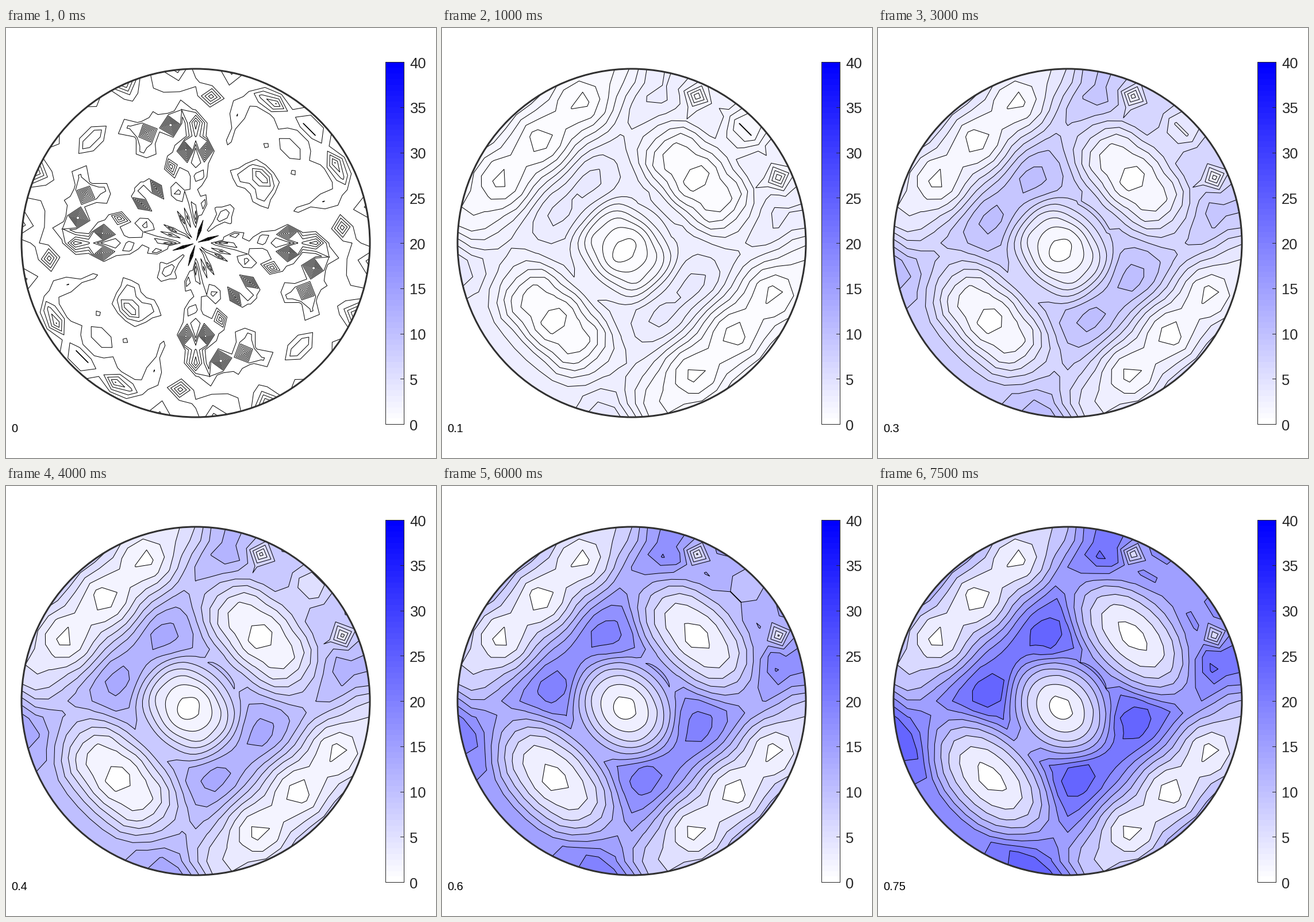
A matplotlib script that plays this animation: 748x748 px, repeating every 8 s.

```python
import numpy as np
import matplotlib.pyplot as plt
from matplotlib.animation import FuncAnimation
from matplotlib.patches import Circle, Rectangle

SIZE, PX = 748, 0.72
CX, CY, R = 330, 374, 303
RINGS, SPOKES = 13, 60
BANDS = 9
FRAMES, STEP = 16, 0.05
plt.rcParams["font.family"] = "Liberation Sans"


def mesh():
    ang = np.linspace(0, 2 * np.pi, SPOKES + 1)
    rad = np.linspace(0, R, RINGS + 1)[:, None]
    return rad * np.cos(ang), rad * np.sin(ang)


def noise():
    """Sparse random cells, mirrored about both diagonals."""
    rng = np.random.default_rng(8)
    cells = 1.05 * rng.exponential(size=(RINGS + 1, 15)) ** 1.25
    cells[0] = 0.2
    flip = cells[:, ::-1]
    full = np.roll(np.hstack([cells, flip, cells, flip]), 8, axis=1)
    return np.hstack([full, full[:, :1]])


def bump(du, dv, width):
    return np.exp(-(du ** 2 + dv ** 2) / (2 * width ** 2))


def mix(a, b, w):
    return a + (b - a) * w


def field(u, v, w):
    """Level map: u runs along the symmetry axis, w goes from early to late."""
    a = np.abs(v)

    # Ridges beside the axis, then a valley on either flank.
    phase = np.pi * np.clip(a - 130, 0, None) / 108
    flank = (1 - np.cos(phase)) / 2
    top = 6.3 - 5.3 * flank + 0.7 * w * np.exp(-((a - 120) / 45) ** 2)
    top += flank * (2 * ((u - 14) / 180) ** 4
                    - 0.6 * np.cos(2 * np.pi * (u - 14) / 100))

    # Summits drift outwards along the ridges and in towards the axis.
    for side in (-1, 1):
        near = -15 + side * mix(45, 70, w)
        far = -15 + side * mix(217, 235, w)
        top += mix(2.0, 1.6, w) * bump(u - near, a - mix(132, 104, w), 36)
        top += 1.4 * bump(u - far, a - mix(158, 136, w), 36)

    # Three basins on the axis: flat at first, cone shaped later.
    n = 3 - w
    dist = np.ones_like(u)
    for centre, length in ((-190, 165), (-18, 112), (160, 165)):
        d = (np.abs((u - centre) / 89) ** n + (a / length) ** n) ** (1 / n)
        dist = np.minimum(dist, d)
    wall = mix(np.sin(np.pi / 2 * dist) ** 3, dist ** 1.6, w)
    low = mix(0.9, 0.5, w) - 0.45 * (1 - w) * np.cos(2 * np.pi * v / 68)
    z = low + (top - low) * wall

    # Pits near the rim; the middle one fills up.
    z -= 5.3 * bump(u - 261, a - 100, 16)
    z -= mix(5.0, 1.5, w) * bump(u - 283, v, 28)
    return np.clip(z, 0.1, BANDS - 0.1)


def draw_colorbar(ax):
    x, y, w, h = 660.5, 59, 32, 630
    for i in range(64):
        c = 1 - i / 63
        ax.add_patch(Rectangle((x, y + h - (i + 1) * h / 64), w, h / 64 + 0.3,
                               fc=(c, c, 1), lw=0, antialiased=False))
    ax.add_patch(Rectangle((x, y), w, h, fill=False, ec="#262626", lw=PX))
    for v in range(0, 41, 5):
        ty = y + h * (1 - v / 40)
        ax.plot([x + w - 6, x + w], [ty, ty], color="#262626", lw=PX)
        ax.text(702, ty + 1, str(v), size=25.5 * PX, color="#262626",
                va="center_baseline")


fig = plt.figure(figsize=(SIZE / 100, SIZE / 100), dpi=100, facecolor="white")
ax = fig.add_axes([0, 0, 1, 1])
ax.set(xlim=(0, SIZE), ylim=(SIZE, 0))
ax.axis("off")

DX, DY = mesh()
U, V = (DX + DY) / np.sqrt(2), (DX - DY) / np.sqrt(2)
draw_colorbar(ax)
ax.add_patch(Circle((CX, CY), R, fill=False, ec="#303030", lw=3 * PX, zorder=5))
label = ax.text(9, 703, "0", size=20 * PX, color="black")
layers = []


def update(i):
    while layers:
        layers.pop().remove()
    t = i * STEP
    z = field(U, V, (t - 0.1) / 0.65) if i else noise()
    unit = 4.4 * t - 0.5 * t * t
    shades = [1 - unit * k / 40 for k in range(BANDS)]
    x, y = CX + DX, CY - DY
    layers.append(ax.contourf(x, y, z, levels=range(BANDS + 1), zorder=1,
                              colors=[(s, s, 1) for s in shades]))
    layers.append(ax.contour(x, y, z, levels=range(1, BANDS), colors="black",
                             linewidths=PX, zorder=2))
    label.set_text(f"{t:.2g}")
    return [label]


anim = FuncAnimation(fig, update, frames=FRAMES, interval=500, repeat=True,
                     repeat_delay=0, blit=False)
plt.show()
```
